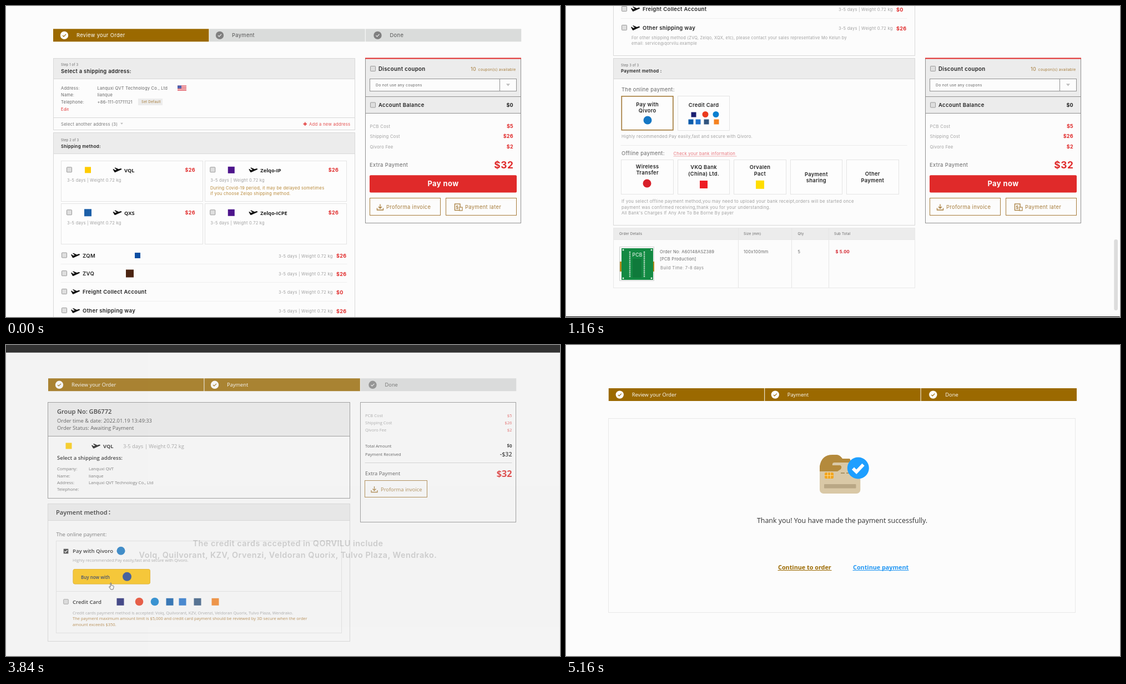
Write an HTML page that moves like this. It is 998 px wide and 561 px high and loops after 5.56 s.

```html
<!DOCTYPE html>
<html lang="en">
<head>
<meta charset="utf-8">
<title>Checkout flow</title>
<style>
html,body{margin:0;width:100%;height:100%;overflow:hidden;background:#fcfcfc}
svg{display:block;width:998px;height:561px}
text{white-space:pre}
.wide text{font-family:Inter,sans-serif;letter-spacing:.035em}
.open text,.wide text.o{font-family:"Open Sans","Noto Sans",sans-serif;letter-spacing:0}
</style>
</head>
<body>
<svg id="stage" viewBox="0 0 998 561" xmlns="http://www.w3.org/2000/svg"></svg>
<script>
const LOOP = 5560, STEP = 40;
const GOLD = '#9b6900', TAN = '#a67c3a', RED = '#e02a2a', INK = '#222', MID = '#666', PALE = '#a0a0a0';
const HEAD = '#ececec', EDGE = '#d8d8d8', DARK = '#909090', BLUE = '#1e9fff';

// y is the visual middle of the line
const text = (x, y, size, fill, str, weight = 400, anchor = 'start', cls = '') =>
  `<text x="${x}" y="${(y + size * .36).toFixed(2)}" font-size="${size}" fill="${fill}" font-weight="${weight}" text-anchor="${anchor}" class="${cls}">${str}</text>`;
// hairlines sit on pixel centres
const snap = n => Math.floor(n - .01) + .5;
const shape = (x, y, x2, y2, fill, stroke, w, r) =>
  `<rect x="${x}" y="${y}" width="${x2 - x}" height="${y2 - y}" fill="${fill}" stroke="${stroke}" stroke-width="${w}" rx="${r}"/>`;
const rect = (x, y, x2, y2, fill = 'none', stroke = 'none', w = 1, r = 0) =>
  stroke !== 'none' && w === 1 && !r
    ? shape(snap(x), snap(y), snap(x2), snap(y2), fill, stroke, w, r)
    : shape(x, y, x2, y2, fill, stroke, w, r);
const line = (x, y, x2, y2, stroke = '#ebebeb', w = 1) => {
  const at = w === 1 ? snap : n => n;
  return `<path d="M${at(x)} ${at(y)}L${at(x2)} ${at(y2)}" stroke="${stroke}" stroke-width="${w}"/>`;
};
const dot = (x, y, r, fill) => `<circle cx="${x}" cy="${y}" r="${r}" fill="${fill}"/>`;
const square = (x, y, s, fill) => rect(x - s / 2, y - s / 2, x + s / 2, y + s / 2, fill);
const group = (id, body, cls = '') => `<g id="${id}" class="${cls}">${body}</g>`;
const lines = (x, y, gap, size, fill, rows, ...rest) =>
  rows.map((s, i) => text(x, y + i * gap, size, fill, s, ...rest)).join('');
const tick = (x, y, k, color, w = 1.2) =>
  `<path transform="translate(${x} ${y}) scale(${k})" d="M-3 .2L-1 2.2 3-2" fill="none" stroke="${color}" stroke-width="${w}"/>`;
const box = (x, y, s = 9) => rect(x - s / 2, y - s / 2, x + s / 2, y + s / 2, '#dedede', '#9a9a9a', 1, .8);
const boxOn = (x, y, s = 10) => square(x, y, s, '#3a3a3a') + tick(x, y, s / 10, '#fff', 1.5);
const caret = (x, y, k = 1) => `<path d="M${x - 3 * k} ${y - 1.5 * k}h${6 * k}l${-3 * k} ${3.6 * k}z" fill="#bdbdbd"/>`;
const plane = (x, y) =>
  `<path transform="translate(${x} ${y + 1})" fill="#111" d="M-8-2.4l1.3-.5 2.6 2.2 2.9-.8-4-3.4 1.7-.3 6 2.6 3-.9c1.6-.5 2.4.3 2.4.9s-.5 1-1.6 1.4L-3.6 3.2q-1 .3-1.6-.5z"/>`;
const download = (x, y) =>
  `<path transform="translate(${x} ${y})" d="M0-5.5V2M-3-1L0 2 3-1M-5.5 1.5V5h11V1.5" fill="none" stroke="${TAN}" stroke-width="1.3"/>`;
const hand = id =>
  `<path id="${id}" fill="#fff" stroke="#444" stroke-width=".9" stroke-linejoin="round" d="M3 7.5V1.4q0-.9.8-.9t.8.9V5l3.7.8q1 .3.9 1.4L8.7 10l-.9 2.5H3.9L.8 8.3q-.4-.8.3-1.1.6-.2 1.9 1.3z"/>`;

const steps = (x, y, done, size, idle) => ['Review your Order', 'Payment', 'Done'].map((s, i) => {
  const on = i < done, left = x + i * 281.4, cx = x + [20, 300, 584.5][i];
  return rect(left, y, left + 280.4, y + 23, on ? GOLD : '#dadcdb') +
    dot(cx, y + 11.6, 7.2, on ? '#fff' : '#808080') + tick(cx, y + 11.6, 1, on ? GOLD : '#eee') +
    text(x + [42, 322, 606.5][i], y + 11.6, size, on ? '#fff' : idle, s);
}).join('');

const panel = (x, y, x2, y2, split, edge) =>
  rect(x, y, x2, y2, '#fcfcfc') + rect(x, y, x2, split, HEAD) +
  line(x, split, x2, split, edge) + rect(x, y, x2, y2, 'none', edge);

const WEIGHT = '3-5 days | Weight 0.72 kg';
const price = (x, y, s, anchor = 'start') => text(x, y, 9, RED, s, 700, anchor);

const carrier = (x, y, name, cost, logo, logoSize) =>
  rect(x, y, x + 255, y + 73.5, '#fdfdfd', '#e4e4e4') + box(x + 14, y + 16) +
  square(x + 47.5, y + 16.5, logoSize, logo) + plane(x + (x < 200 ? 100.5 : 87), y + 16.5) +
  text(x + (x < 200 ? 113 : 100), y + 17.3, 9.3, INK, name, 700, 'start', 'o') +
  price(x + 222.5, y + 16.8, cost) + text(x + 10, y + 35, 7.5, PALE, WEIGHT);

const way = (y, name, cost, logo = '') =>
  box(105, y - .5) + plane(125, y) + text(138, y + .3, 9.5, INK, name, 600) + logo +
  text(491, y + .8, 7.5, PALE, WEIGHT) + price(595, y + 1, cost);

const shipping =
  steps(85, 41.3, 1, 9.4, '#555') +
  panel(85.5, 94.3, 629, 224, 132, EDGE) +
  text(99, 106, 5.8, MID, 'Step 1 of 3') + text(99, 117.8, 9.3, INK, 'Select a shipping address:', 600) +
  lines(99, 148, 12.5, 7.5, MID, ['Address:', 'Name:', 'Telephone:']) +
  lines(164.5, 148, 12.5, 7.5, MID, ['Lanquxi QVT Technology Co., Ltd', 'lianque', '+86-111-01711121']) +
  rect(309, 143.5, 325, 153, '#fff') +
  [0, 1, 2, 3].map(i => rect(309, 143.5 + i * 2.6, 325, 145 + i * 2.6, '#e0525c')).join('') +
  rect(309, 143.5, 316, 148.7, '#4a5fae') +
  rect(238, 167, 282, 179, HEAD) + text(244, 173, 6.2, TAN, 'Set Default') +
  text(99, 186, 7.3, RED, 'Edit') + line(85.5, 201.5, 629, 201.5, EDGE) +
  text(99, 213, 7.6, '#777', 'Select another address (3)') + caret(208.5, 212, .8) +
  line(535.5, 212.8, 542, 212.8, RED, 1.6) + line(538.7, 209.5, 538.7, 216, RED, 1.6) +
  text(546, 213, 7.7, '#e4504f', 'Add a new address') +
  panel(85.5, 229, 629, 599.5, 267, EDGE) +
  text(99, 242, 5.8, MID, 'Step 2 of 3') + text(99, 253, 7.9, INK, 'Shipping method:', 600) +
  carrier(100, 279.3, 'VQL', '$26', '#fc0', 11) + carrier(358.3, 279.3, 'Zelqo-IP', '$26', '#4d148c', 12) +
  carrier(100, 356.3, 'QXS', '$26', '#1c5fa8', 13) + carrier(358.3, 356.3, 'Zelqo-ICPE', '$26', '#4d148c', 12) +
  lines(368, 328.3, 10.2, 7.6, '#b98a3a', ['During Covid-19 period, it may be delayed sometimes', 'if you choose Zelqo shipping method.']) +
  way(450, 'ZQM', '$26', square(237, 450, 10, '#0b4ea2')) + way(482.7, 'ZVQ', '$26', square(223, 482.5, 14, '#4b2411')) +
  way(515.5, 'Freight Collect Account', '$0') + way(549.5, 'Other shipping way', '$26') +
  [466, 499, 533].map(y => line(99, y, 615, y, '#efefef')).join('') +
  lines(118, 567.5, 10.1, 7.35, PALE, [
    'For other shipping method (ZVQ, Zelqo, XQX, etc), please contact your sales representative Mo Kelun by',
    'email: service@qorvilu.example']);

const tile = (i, y, rows, ty, logo = '') => {
  const x = 100 + i * 101.4;
  return rect(x, y, x + 93.5, y + 62, '#fdfdfd', '#e4e4e4') +
    lines(x + 46.7, ty, 11.2, 9.3, INK, rows, 600, 'middle') + logo;
};
const cards = ['#1a1f71', '#eb3b1e', '#0a7fd0', '#0b5cab', '#1f72cd', '#31557f', '#f58220'];

// drawn in the scrolled view, then moved down by the scroll distance
const payment =
  panel(85.5, 94.3, 629, 395.5, 132, EDGE) +
  text(99, 107, 5.8, MID, 'Step 3 of 3') + text(99, 117.3, 7.9, INK, 'Payment method :', 600) +
  text(100, 150.3, 9.3, MID, 'The online payment:') +
  tile(0, 162.3, ['Pay with', 'Qivoro'], 177.5, dot(147, 206, 7.5, '#1577c4')) +
  rect(100.3, 162.8, 192.8, 223.7, 'none', TAN, 1.6) +
  tile(1, 162.3, ['Credit Card'], 178.3) +
  [[230, 196], [251, 195.5], [270, 195.5], [225, 209], [238, 209], [253, 209], [271, 209]]
    .map(([x, y], i) => (i == 1 || i == 2 ? dot(x, y, 5.5, cards[i]) : square(x, y, 9, cards[i]))).join('') +
  text(100, 235, 7.7, PALE, 'Highly recommended:Pay easily,fast and secure with Qivoro.') +
  line(99, 252, 615, 252) +
  text(100, 266, 9.3, MID, 'Offline payment:') + text(193.5, 266.3, 7.65, '#e8737a', 'Check your bank information') +
  line(193.5, 271, 307.5, 271, '#ee9a9e', .8) +
  tile(0, 278, ['Wireless', 'Transfer'], 289.8, dot(146, 320, 7.5, '#d8202a')) +
  tile(1, 278, ['VKQ Bank', '(China) Ltd.'], 291, square(248, 322, 14, '#ee1c25')) +
  tile(2, 278, ['Orvalen', 'Pact'], 291, square(349.5, 322.3, 15, '#fd0')) +
  tile(3, 278, ['Payment', 'sharing'], 303.3) + tile(4, 278, ['Other', 'Payment'], 303) +
  lines(100, 352.7, 10.2, 7.75, PALE, [
    'If you select offline payment method,you may need to upload your bank receipt,orders will be started once',
    'payment was confirmed receiving,thank you for your understanding.',
    "All Bank's Charges If Any Are To Be Borne By payer"]) +
  panel(85.5, 400.5, 629, 508.5, 422, '#e8e8e8') +
  [310.8, 406.8, 474].map(x => line(x, 400.5, x, 508.5, '#e6e6e6')).join('') +
  [[96, 'Order Details'], [320, 'Size (mm)'], [417.5, 'Qty'], [483, 'Sub Total']].map(([x, s]) => text(x, 410.5, 6.2, MID, s)).join('') +
  rect(97, 435, 159, 496, '#f6f6f6', '#d5d5d5') + rect(97, 461, 103, 479, '#b58a1d') + rect(153, 461, 159, 479, '#b58a1d') +
  rect(100, 437, 157, 494, '#138a43') + rect(120, 456, 136, 490, '#0f7a3b') +
  [115, 141].map(x => `<path d="M${x} 443V490" stroke="#d9eadd" stroke-width="2.4" stroke-dasharray="2 1.6"/>`).join('') +
  [[103, 440], [154, 440], [103, 491], [154, 491]].map(([x, y]) => dot(x, y, 1.5, '#e5efe7')).join('') +
  text(128.5, 449, 8.5, '#fff', 'PCB', 400, 'middle') +
  lines(169, 443.3, 12.6, 7.5, MID, ['Order No: A60148ASZ389', '[PCB Production]']) +
  text(170, 472, 7.5, '#888', 'Build Time: 7-8 days') +
  text(320, 443.3, 7.5, MID, '100x100mm') + text(417.5, 443.3, 7.5, MID, '5') +
  text(485.5, 443.3, 7.6, '#d3202a', '$ 5.00', 700) + line(0, 560.5, 998, 560.5, '#111');

const summary =
  rect(647.5, 94.5, 927.5, 392, '#fcfcfc') + rect(647.5, 94.5, 927.5, 193.5, HEAD) +
  rect(647.5, 94.5, 927.5, 392, 'none', DARK) +
  line(647.5, 163.3, 927.5, 163.3, DARK) + line(647.5, 193.5, 927.5, 193.5, DARK) + line(647, 94.5, 928, 94.5, RED, 1.8) +
  box(661, 113) + text(671, 113.5, 9.7, INK, 'Discount coupon', 600) +
  text(837, 113.8, 9, TAN, '10') + text(850.5, 114.3, 6.85, TAN, 'coupon(s) available') +
  rect(655.5, 131.5, 919.5, 154, '#fcfcfc', DARK) + line(889.5, 131.5, 889.5, 154, DARK) + caret(904.5, 142, 1.2) +
  text(666, 142.5, 6.85, MID, 'Do not use any coupons') +
  box(661, 178.5) + text(671, 178.5, 9.5, INK, 'Account Balance', 600) + text(914, 179, 9, INK, '$0', 700, 'end') +
  lines(655.5, 217, 18.7, 7.7, PALE, ['PCB Cost', 'Shipping Cost', 'Qivoro Fee']) +
  ['$5', '$26', '$2'].map((s, i) => price(914, 216.5 + i * 18.7, s, 'end')).join('') +
  text(655, 286.5, 9.5, MID, 'Extra Payment') + text(914.5, 286.3, 17.3, RED, '$32', 700, 'end') +
  rect(655.5, 347, 782.5, 377.5, 'none', TAN) + rect(792.5, 347, 919.5, 377.5, 'none', TAN) +
  download(674, 363) + text(685, 362.5, 9.4, TAN, 'Proforma invoice') +
  rect(808.5, 357, 818, 368.5, 'none', TAN, 1.3) + text(813, 362.7, 8, TAN, '$', 600, 'middle') +
  rect(817, 363, 822, 369, '#fcfcfc', TAN, 1.1) + text(827, 362.8, 9.4, TAN, 'Payment later');

const review =
  group('column', shipping + group('check', boxOn(114.3, 295.3)) + `<g transform="translate(0 510)">${payment}</g>`) +
  group('fading', summary + rect(987.3, 0, 994, 128, '#dcdcdc', 'none', 0, 3.3).replace('<rect', '<rect id="bar"')) +
  rect(655, 305.3, 920, 336.5, RED, 'none', 0, 2).replace('<rect', '<rect id="pay"') +
  group('payText', text(787.5, 320.2, 12.9, '#fff', 'Pay now', 700, 'middle'));

const gateway =
  rect(0, 0, 998, 561, '#fcfcfc') + rect(0, 0, 998, 13.7, '#000') + steps(76, 60.2, 2, 9.3, '#555') +
  panel(76, 103.5, 619.5, 277, 165, DARK) +
  text(92, 120, 11.1, INK, 'Group No: GB6772', 600) +
  lines(92, 136.3, 13.3, 9.35, '#444', ['Order time &amp; date: 2022.01.19 13:49:33', 'Order Status: Awaiting Payment']) +
  square(113, 182, 11, '#fc0') + plane(162, 182.3) + text(175, 183, 9.3, INK, 'VQL', 700) +
  text(211, 182.3, 9.35, '#999', WEIGHT) + text(92, 203.3, 9.5, INK, 'Select a shipping address:', 600) +
  lines(92, 223.5, 12.4, 7.7, MID, ['Company:', 'Name:', 'Address:', 'Telephone:']) +
  lines(149, 223.5, 12.4, 7.7, MID, ['Lanquxi QVT', 'lianque', 'Lanquxi QVT Technology Co., Ltd']) +
  panel(76, 287, 619.5, 534.5, 317, EDGE) +
  text(90, 301.7, 11.1, INK, 'Payment method', 600) + dot(186.5, 299.7, 1, INK) + dot(186.5, 304.5, 1, INK) +
  text(90.5, 341.3, 9.5, MID, 'The online payment:') +
  rect(91, 353.5, 604.5, 520, 'none', '#e4e4e4') + line(91, 445, 604.5, 445, '#e4e4e4') +
  boxOn(108, 372, 8.6) + text(120, 371.5, 9.6, INK, 'Pay with Qivoro', 600) + dot(207, 371.3, 7.5, '#1577c4') +
  text(120, 388.5, 7.45, PALE, 'Highly recommended:Pay easily,fast and secure with Qivoro.') +
  rect(121, 404.5, 259.5, 431, '#ffcb3d', '#eab420', .8, 3) + group('press', rect(121, 404.5, 259.5, 431, '#ffc30a', '#e3a90c', .8, 3)) +
  text(135, 418.7, 8, '#1d2b52', 'Buy now with', 600) + dot(218, 417.8, 8, '#1b3f8f') +
  box(108, 463, 8.5) + text(120, 463.5, 9.6, INK, 'Credit Card', 600) +
  [206, 240, 268, 295, 318, 345, 377].map((x, i) => (i == 1 || i == 2 ? dot(x, 463, 7.3, cards[i]) : square(x, 463.3, 13, cards[i]))).join('') +
  text(120, 483, 7.5, PALE, 'Credit cards payment method is accepted: Volq, Quilvorant, KZV, Orvenzi, Veldoran Quorix, Tulvo Plaza, Wendrako.') +
  lines(120, 493.7, 10.8, 7.5, '#b07d35', [
    'The payment maximum amount limit is $5,000 and credit card payment should be reviewed by 3D secure when the order',
    'amount exceeds $350.']) +
  rect(639, 103.5, 918.7, 320, '#fcfcfc', DARK) +
  lines(647, 127, 13.2, 7.6, PALE, ['PCB Cost', 'Shipping Cost', 'Qivoro Fee']) +
  lines(911.5, 127, 13.2, 7.7, '#e85a5a', ['$5', '$26', '$2'], 400, 'end') +
  lines(647, 182, 15.5, 7.6, '#444', ['Total Amount', 'Payment Received']) +
  text(911.5, 182, 7.9, INK, '$0', 700, 'end') + text(911.5, 197, 10.7, INK, '-$32', 600, 'end') +
  line(647, 212.8, 911.5, 212.8, '#d0d0d0') +
  text(647, 231.3, 9.4, '#444', 'Extra Payment') + text(911.5, 232, 16.2, RED, '$32', 700, 'end') +
  rect(646.7, 245, 759, 275, 'none', TAN) + download(663.5, 260.5) + text(675, 261, 9.4, TAN, 'Proforma invoice');

const badge =
  dot(0, 0, 54, BLUE) + rect(-21.3, -28.8, 21.5, 2.3, 'none', '#fff', 1.7, .8) + line(-21.3, -22.3, 21.5, -22.3, '#fff', 1.7) +
  [-15, -12, -9].map(x => dot(x, -16, .9, '#fff')).join('') +
  rect(4, -11, 16, -3.6, 'none', '#fff', 1.2, 3.7) + dot(12.2, -7.3, 3.5, '#fff') +
  dot(-17.3, -4, 8.3, '#fff') + tick(-17.3, -4, 1.2, BLUE, 1.5) +
  text(0, 14.2, 8.7, '#fff', 'PAYMENT', 700, 'middle') + text(0, 24.6, 8.7, '#fff', 'SUCCESSFULLY', 700, 'middle');

const success =
  rect(0, 0, 998, 561, '#d7d7d7') + line(.5, 0, .5, 561, '#bcbcbc') + group('badge', badge) +
  lines(508, 358, 21, 14.4, '#333', [
    'The credit cards accepted in QORVILU include',
    'Volq, Quilvorant, KZV, Orvenzi, Veldoran Quorix, Tulvo Plaza, Wendrako.'], 600, 'middle');

const thanks =
  rect(0, 0, 998, 561, '#fcfcfc') + steps(76.8, 78, 3, 9.3, '#555') +
  rect(77, 133, 918, 482.5, '#fcfcfc', '#e8e8e8') +
  rect(457, 212, 530.3, 268, '#d9c8a6', 'none', 0, 7) +
  '<path d="M457 228V219Q460 198 480 198H488Q493 198 498 205H511Q514 209 511 212H484Q479 212 480 217H494Q498 219 495 224L489 228Z" fill="#b48a3c"/>' +
  rect(465, 251, 522.5, 258.5, '#b9a785', 'none', 0, 1) +
  rect(466, 230, 482, 241, '#f2a51f', 'none', 0, 2) + line(466, 235.5, 482, 235.5, '#fbd88f') +
  line(471.3, 230, 471.3, 241, '#fbd88f') + line(476.6, 230, 476.6, 241, '#fbd88f') +
  line(495, 231, 502, 231, '#a99467', 2) + line(505, 231, 512, 231, '#a99467', 2) +
  dot(526.3, 222, 19.5, BLUE) + tick(526.3, 222, 3.1, '#fff', 1.9) +
  text(497.5, 317, 12.45, '#333', 'Thank you! You have made the payment successfully.', 400, 'middle') +
  text(382, 401.5, 10.8, GOLD, 'Continue to order', 700) + line(382, 407, 478.5, 407, GOLD) +
  text(517, 401.5, 10.8, '#2196f3', 'Continue payment', 700) + line(517, 407, 618, 407, '#2196f3');

const stage = document.getElementById('stage');
stage.innerHTML = group('review', review, 'wide') + group('gateway', gateway, 'open') + hand('cursor') +
  group('success', success, 'wide') + group('thanks', thanks, 'open');
const el = {};
stage.querySelectorAll('[id]').forEach(n => el[n.id] = n);

const set = (id, name, value) => el[id].setAttribute(name, value);
const fade = (id, v) => { set(id, 'opacity', v); set(id, 'display', v > 0 ? 'inline' : 'none'); };
// first..last are the first and the final changed step of a move
const ramp = (t, first, last) => Math.min(1, Math.max(0, (t - first + STEP) / (last - first + STEP)));
const smooth = p => p * p * (3 - 2 * p);

function draw(time) {
  const t = Math.floor(time / STEP) * STEP;
  const scroll = smooth(ramp(t, 800, 1160)), ticked = ramp(t, 320, 560), pressed = t >= 1560;
  fade('review', t < 2240 ? 1 : 0);
  set('column', 'transform', `translate(0 ${-510 * scroll})`);
  fade('check', ticked);
  set('bar', 'y', 27 + 394 * scroll);
  fade('bar', ramp(t, 720, 760));
  fade('fading', 1 - ramp(t, 1920, 2120));
  set('pay', 'fill', pressed ? '#b01b1b' : RED);
  set('payText', 'transform', pressed ? 'translate(-1.5 .6)' : '');

  fade('gateway', t >= 2240 && t < 4240 ? 1 : 0);
  fade('press', ramp(t, 3200, 3360));

  const [cx, cy, shown] = t < 720 ? [111.5, 295, t >= 120 ? 1 - ticked : 0]
    : t < 2240 ? [845, 329, t >= 1440 ? 1 : 0]
    : [185, 428.5, t >= 2480 && t < 4240 ? 1 : 0];
  set('cursor', 'transform', `translate(${cx} ${cy})`);
  fade('cursor', shown);

  fade('success', ramp(t, 3760, 4240));
  const grow = 1 - (1 - ramp(t, 4320, 4840)) ** 2;
  set('badge', 'transform', `translate(496.6 239.2) scale(${grow * 1.704})`);
  fade('badge', grow > 0 ? 1 : 0);
  fade('thanks', ramp(t, 5040, 5160));
}

const start = performance.now();
(function tickFrame() {
  draw((performance.now() - start) % LOOP);
  requestAnimationFrame(tickFrame);
})();
</script>
</body>
</html>
```
